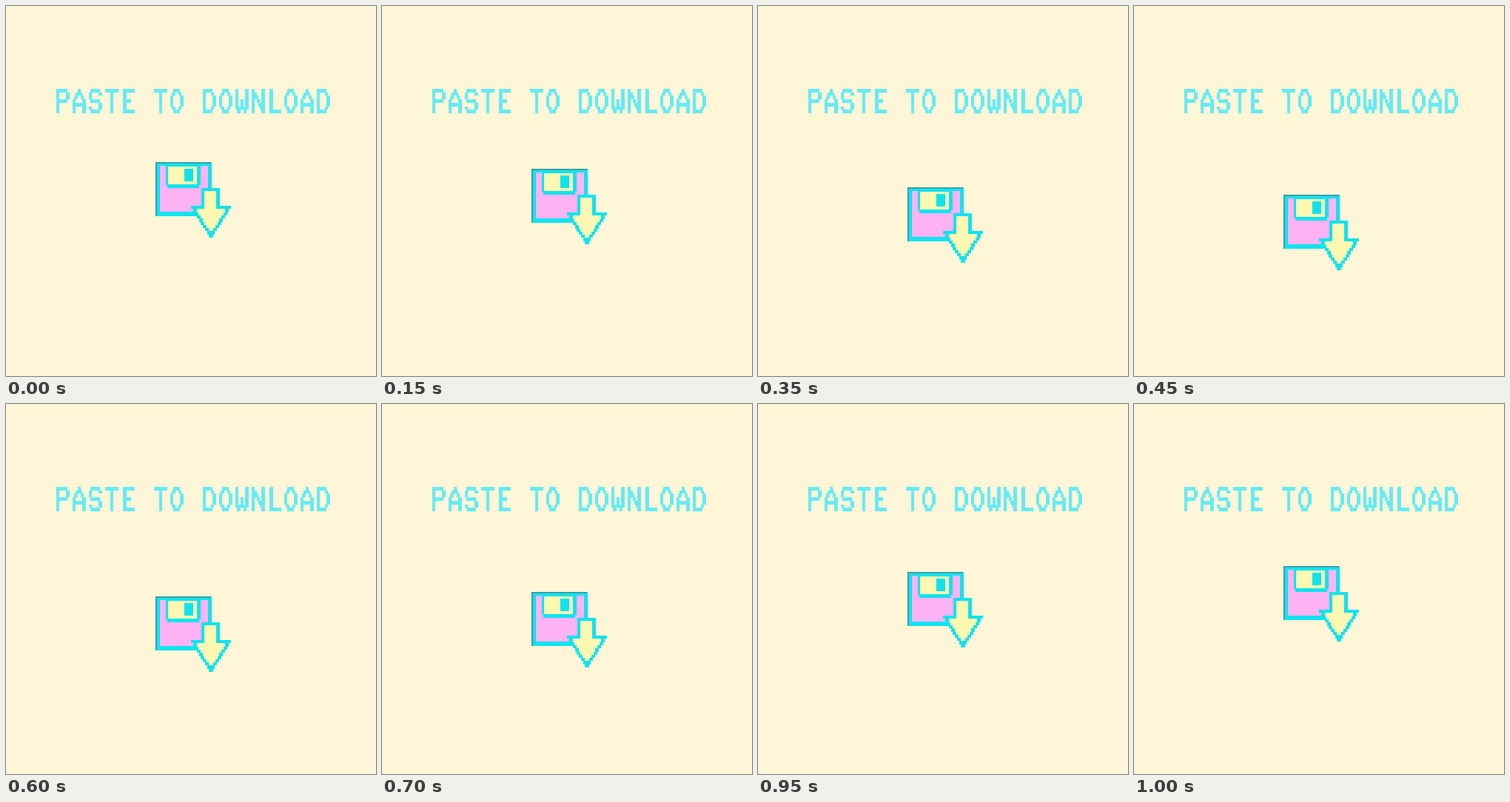
An HTML page with a canvas for the animation above (1.05 s loop, 500x500 px).

```html
<!DOCTYPE html>
<html lang="en">
<head>
<meta charset="utf-8">
<title>Paste to download</title>
<style>
  html, body { margin: 0; height: 100%; overflow: hidden; background: #fff5d7; }
  canvas { display: block; }
</style>
</head>
<body>
<canvas id="stage" width="500" height="500" role="img" aria-label="PASTE TO DOWNLOAD"></canvas>
<script>
const ctx = document.getElementById('stage').getContext('2d');
const PAPER = '#fff5d7', INK = '#66ebf5', CYAN = '#10e3ef';
const PINK = '#fdb2f3', YELLOW = '#fcf8b2', SHADE = '#438c91';
const LOOP = 1050, STEP = 50;

// Pen strokes on a 7 x 7 grid; "/" lifts the pen.
const GLYPHS = {
  P: '0,6 0,0 5,0 6,1 6,2 5,3 0,3',
  A: '0,6 0,3 3,0 6,3 6,6/0,4 6,4',
  S: '6,1 5,0 1,0 0,1 0,2 1,3 5,3 6,4 6,5 5,6 1,6 0,5',
  T: '0,0 6,0/3,0 3,6',
  E: '6,0 1,0 1,6 6,6/1,3 4,3',
  O: '2,0 4,0 6,2 6,4 4,6 2,6 0,4 0,2 2,0',
  D: '0,0 4,0 6,2 6,4 4,6 0,6 0,0',
  W: '0,0 0,5 1,6 3,4 3,3/3,4 5,6 6,5 6,0',
  N: '0,6 0,0 6,6 6,0',
  L: '1,0 1,6 6,6'
};

function rect(color, x, y, w, h) {
  ctx.fillStyle = color;
  ctx.fillRect(x, y, w, h);
}

// Each dot is one row tall and two columns wide.
function drawDot(left, top, col, row) {
  const cw = 2.2, ch = 4.7;
  const x = Math.round(left + col * cw), y = Math.round(top + row * ch);
  const right = Math.round(left + (col + 2) * cw);
  const bottom = Math.round(top + (row + 1) * ch);
  rect(INK, x, y, right - x, bottom - y);
}

function drawGlyph(strokes, left, top) {
  for (const stroke of strokes.split('/')) {
    const pts = stroke.split(' ').map(p => p.split(',').map(Number));
    for (let i = 1; i < pts.length; i++) {
      const [x0, y0] = pts[i - 1], [x1, y1] = pts[i];
      const n = Math.max(Math.abs(x1 - x0), Math.abs(y1 - y0));
      for (let k = 0; k <= n; k++) {
        drawDot(left, top, x0 + (x1 - x0) * k / n, y0 + (y1 - y0) * k / n);
      }
    }
  }
}

function drawText(text, x, y) {
  [...text].forEach((c, i) => GLYPHS[c] && drawGlyph(GLYPHS[c], x + i * 22, y));
}

function drawDisk() {
  rect(CYAN, 202, 211, 76, 73);
  rect(SHADE, 202, 211, 75, 1.5);
  rect(SHADE, 202, 211, 1.5, 73);
  rect(PINK, 208, 216, 65, 62);
  rect(CYAN, 216, 215, 47, 27);
  rect(CYAN, 218, 242, 43, 4);
  rect(YELLOW, 219, 217, 39, 24);
  rect(CYAN, 241, 220, 12, 17);
}

function drawArrow() {
  const mid = 277, top = 270, row = 4.3, rows = 10;
  rect(CYAN, 264, 246, 25, 28);
  for (let i = 0; i < rows; i++) {
    const y = Math.round(top + i * row), h = Math.round(top + (i + 1) * row) - y;
    const half = Math.round(27 - i * 2.7), inner = half - 5;
    rect(CYAN, mid - half, y, 2 * half, h);
    if (i > 0 && inner > 0) rect(YELLOW, mid - inner, y, 2 * inner, h);
  }
  rect(YELLOW, 268, 250, 16, 26);
}

// Heights of the bob, joined by a smooth periodic curve.
const KEYS = [[0, 0], [150, 9], [250, 22], [450, 44], [600, 49], [850, 29.5], [1000, 8]];

function key(i) {
  const n = KEYS.length, [t, y] = KEYS[(i + n) % n];
  return [t + Math.floor(i / n) * LOOP, y];
}

function slope(i) {
  const [t0, y0] = key(i - 1), [t1, y1] = key(i + 1);
  return (y1 - y0) / (t1 - t0);
}

function bob(t) {
  let i = KEYS.length - 1;
  while (KEYS[i][0] > t) i--;
  const [t0, y0] = key(i), [t1, y1] = key(i + 1);
  const h = t1 - t0, s = (t - t0) / h, r = 1 - s;
  return y0 * r * r * (1 + 2 * s) + y1 * s * s * (3 - 2 * s)
    + h * s * r * (slope(i) * r - slope(i + 1) * s);
}

function frame(now) {
  const t = Math.floor(now % LOOP / STEP) * STEP;
  rect(PAPER, 0, 0, 500, 500);
  drawText('PASTE TO DOWNLOAD', 68, 112);
  ctx.save();
  ctx.translate(0, Math.round(bob(t)));
  drawDisk();
  drawArrow();
  ctx.restore();
}

const start = performance.now();
function tick() {
  frame(performance.now() - start);
  requestAnimationFrame(tick);
}
tick();
</script>
</body>
</html>
```
